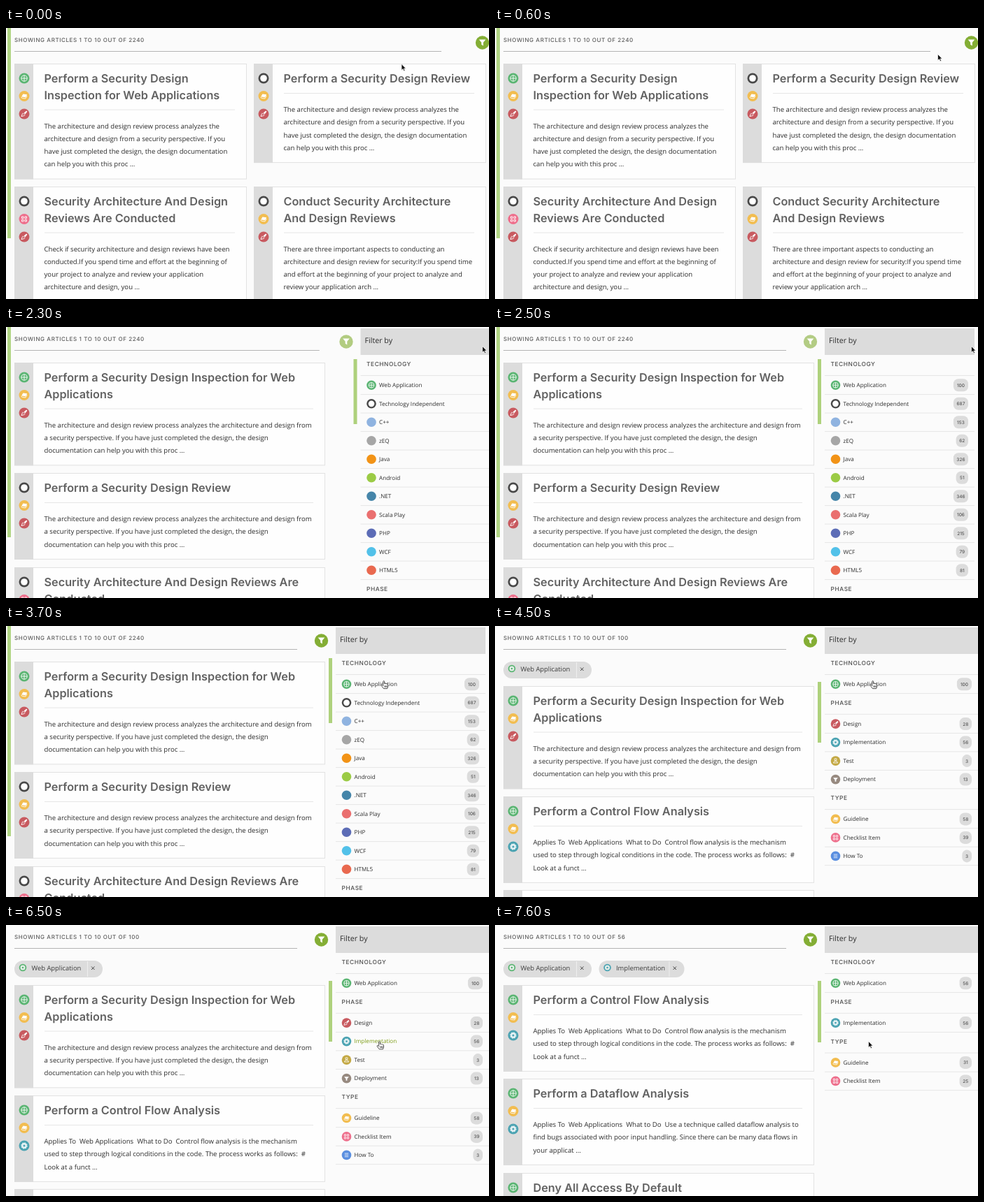
Recreate the animation shown at these times as an HTML page. Size 690x388 px, loop 8 s.

```html
<!DOCTYPE html>
<html lang="en">
<head>
<meta charset="utf-8">
<title>Article filter</title>
<style>
  html, body { margin: 0; width: 100%; height: 100%; overflow: hidden; background: #fbfbfb; }
  svg { display: block; width: 100%; height: 100%; }
  text { white-space: pre; text-rendering: geometricPrecision; font-family: "Open Sans", "Noto Sans", sans-serif; fill: #2c2c2c; }
  .title, .status, .section, .count { font-family: Inter, Roboto, sans-serif; }
  .title { font-size: 16.25px; font-weight: 600; fill: #626262; }
  .body { font-size: 9.6px; }
  .status { font-size: 8px; letter-spacing: .6px; font-weight: 500; fill: #5c5c5c; }
  .section { font-size: 8.4px; letter-spacing: .55px; font-weight: 500; fill: #4c4c4c; }
  .filter { font-size: 10.7px; }
  .item { font-size: 8.15px; }
  .chip { font-size: 9.4px; fill: #3c3c3c; }
  .count { font-size: 6.5px; font-weight: 500; text-anchor: middle; fill: #555; }
  .hover { fill: #7c9c14; }
</style>
</head>
<body>
<svg id="stage" viewBox="0 0 690 388"></svg>
<script>
const rect = (x, y, w, h, fill, extra = '') =>
  `<rect x="${x}" y="${y}" width="${w}" height="${h}" fill="${fill}" ${extra}/>`;
const line = (x1, x2, y, color = '#e6e6e6') =>
  `<path d="M${x1} ${y}H${x2}" stroke="${color}"/>`;
const text = (x, y, cls, str) => `<text x="${x}" y="${y}" class="${cls}">${str}</text>`;

// Category icons: colour and white glyph, drawn for a disc of radius 7.5
const glyph = d => `<path d="${d}" fill="none" stroke="#fff" stroke-width=".9"/>`;
const ring = '<circle r="4.2" fill="none" stroke="#fff" stroke-width=".9"/>';
const ICONS = {
  web: ['#5bb573', ring + glyph('M0-4.2V4.2M-4.2 0H4.2')],
  any: ['#484848', '<circle r="4.8" fill="#fff"/>'],
  guide: ['#f2bd50', '<path d="M-1.6-3L4.2-2.2 2 1.8-3.8 1Z" fill="#fff"/>' + glyph('M-4 1.4Q-4 2.8-2.5 3L2 3.4 4-.5')],
  design: ['#c85a60', '<path d="M3.2-4.4L4.4-3.2 1.4.4-.4-1.4Z" fill="#fff"/>' + glyph('M-1.8-1.2L1.2 1.8M-2.4-.6L-4 3.6.6 2.4')],
  check: ['#ee6f8c', glyph('M-3.5-3.5h2.5v2.5h-2.5zM1-3.5h2.5v2.5H1zM-3.5 1h2.5v2.5h-2.5zM1 1h2.5v2.5H1z')],
  code: ['#4ba3b2', '<circle r="3.9" fill="#fff" opacity=".85"/><circle r="4.2" fill="none" stroke="#fff" stroke-dasharray="1.6 1.7"/><circle r="1.5" fill="#4ba3b2"/>'],
  test: ['#c4a945', glyph('M-1.5-3.5h3v3h-3zM-3.5 3.2Q-3 .5 0 .5T3.5 3.2Z')],
  deploy: ['#978a80', '<path d="M-3.8-2.6H3.8L1 .6V3.4H-1V.6Z" fill="#fff"/>'],
  howto: ['#5a8fe0', glyph('M-3-2.5H3M-3 0H3M-3 2.5H3')]
};
function icon(name, x, y, r = 7.5) {
  const [color, mark] = ICONS[name] || [name, ''];
  return `<g transform="translate(${x} ${y}) scale(${r / 7.5})"><circle r="7.5" fill="${color}"/>${mark}</g>`;
}

function card(x, y, w, icons, titles, lines) {
  const ruleY = y + 42.5 + 23.5 * (titles.length - 1);
  const h = ruleY - y + 44 + 18.2 * (lines.length - 1);
  return rect(x + .5, y + .5, w, h, '#fefefe', 'stroke="#e2e2e2"') +
    rect(x, y, 27, h + 1, '#dcdcdc') +
    icons.map((name, i) => icon(name, x + 14, y + 21 + 25.5 * i)).join('') +
    titles.map((s, i) => text(x + 42.5, y + 27.2 + 23.5 * i, 'title', s)).join('') +
    line(x + 43, x + w - 16, ruleY) +
    lines.map((s, i) => text(x + 42.5, ruleY + 26.6 + 18.2 * i, 'body', s)).join('');
}

function chip(x, w, name, label) {
  const color = ICONS[name][0];
  return rect(x, 51, w, 24, '#dcdcdc', 'rx="12"') +
    `<circle cx="${x + 12}" cy="61" r="4.4" fill="#e6eeea" stroke="${color}" stroke-width="1.8"/>` +
    `<circle cx="${x + 12}" cy="61" r="1.3" fill="${color}"/>` +
    text(x + 24.5, 65, 'chip', label) +
    `<path d="M${x + w - 21.5} 52v22" stroke="#eee"/>` +
    `<path d="M${x + w - 16} 59.5l4.5 4.5m0-4.5l-4.5 4.5" stroke="#444"/>`;
}

// Each section: [heading, [icon, label, count], ...]
function sidebar(right, sections, barY, barH) {
  let y = 53;
  let out = rect(460, 0, 230, 388, '#fbfbfb') + rect(461, barY, 5, barH, '#aed17c') +
    rect(471, 2, right - 471, 38, '#dcdcdc') + text(477, 23.2, 'filter', 'Filter by');
  for (const [heading, ...items] of sections) {
    out += text(479.5, y + 3, 'section', heading) + line(471, right, y + 16.5);
    y += 30.3;
    for (const [name, label, count] of items) {
      const w = 10 + 3.7 * String(count).length, end = Math.min(right - 9, 681);
      out += icon(name, 486.5, y, 6.8) +
        `<text x="497.5" y="${y + 2.8}" class="item" data-label="${label}">${label}</text>` +
        rect(end - w, y - 9, w, 18, '#dcdcdc', 'rx="7"') +
        text(end - w / 2, y + 2.4, 'count', count) + line(471, right, y + 13.3);
      y += 26.5;
    }
  }
  return out;
}

const REVIEW = 'Perform a Security Design Review';
const INSPECT = ['Perform a Security Design Inspection for Web', 'Applications'];
const wideBody = ['The architecture and design review process analyzes the',
  'architecture and design from a security perspective. If you',
  'have just completed the design, the design documentation', 'can help you with this proc …'];
const longBody = ['The architecture and design review process analyzes the architecture and design from',
  'a security perspective. If you have just completed the design, the design',
  'documentation can help you with this proc …'];
const controlFlow = [['web', 'guide', 'code'], ['Perform a Control Flow Analysis'],
  ['Applies To  Web Applications  What to Do  Control flow analysis is the mechanism',
   'used to step through logical conditions in the code. The process works as follows:  #',
   'Look at a funct …']];
const webDesign = ['web', 'guide', 'design'], anyDesign = ['any', 'guide', 'design'];
const status = s => text(12, 19.5, 'status', 'SHOWING ARTICLES 1 TO 10 OUT OF ' + s);
const greenBar = rect(2, 0, 5, 301, '#b1d584');

const twoColumns = status(2240) + greenBar +
  card(12, 51, 331, webDesign, ['Perform a Security Design', 'Inspection for Web Applications'], wideBody) +
  card(354, 51, 331, anyDesign, [REVIEW], wideBody) +
  card(12, 227, 331, ['any', 'check', 'design'], ['Security Architecture And Design', 'Reviews Are Conducted'],
    ['Check if security architecture and design reviews have been',
     'conducted.If you spend time and effort at the beginning of',
     'your project to analyze and review your application', 'architecture and design, you …']) +
  card(354, 227, 331, anyDesign, ['Conduct Security Architecture', 'And Design Reviews'],
    ['There are three important aspects to conducting an',
     'architecture and design review for security:If you spend time',
     'and effort at the beginning of your project to analyze and', 'review your application arch …']);

const oneColumn = status(2240) + greenBar +
  card(12, 51, 443, webDesign, INSPECT, longBody) +
  card(12, 209, 443, anyDesign, [REVIEW], longBody) +
  card(12, 344, 443, ['any', 'check', 'design'], ['Security Architecture And Design Reviews Are', 'Conducted'], ['']);

const allFilters = sidebar(685, [['TECHNOLOGY', ['web', 'Web Application', 100],
  ['any', 'Technology Independent', 687], ['#8fb3e0', 'C++', 153], ['#a6a6a6', 'zEQ', 62],
  ['#f29316', 'Java', 326], ['#9bcb45', 'Android', 51], ['#4585a9', '.NET', 346],
  ['#ea6f6f', 'Scala Play', 106], ['#5c6cb6', 'PHP', 215], ['#52c1e9', 'WCF', 79],
  ['#e9694f', 'HTML5', 81]], ['PHASE']], 46, 93);

const webOnly = status(100) + chip(12, 126, 'web', 'Web Application') +
  card(12, 86, 443, webDesign, INSPECT, longBody) +
  card(12, 244, 443, ...controlFlow) + card(12, 378, 443, [], [''], ['']) +
  sidebar(690, [['TECHNOLOGY', ['web', 'Web Application', 100]],
    ['PHASE', ['design', 'Design', 28], ['code', 'Implementation', 56], ['test', 'Test', 3], ['deploy', 'Deployment', 13]],
    ['TYPE', ['guide', 'Guideline', 58], ['check', 'Checklist Item', 39], ['howto', 'How To', 3]]], 80, 87);

const webImplementation = status(56) + chip(12, 126, 'web', 'Web Application') +
  chip(148.5, 122, 'code', 'Implementation') +
  card(12, 86, 443, ...controlFlow) +
  card(12, 220, 443, controlFlow[0], ['Perform a Dataflow Analysis'],
    ['Applies To  Web Applications  What to Do  Use a technique called dataflow analysis to',
     'find bugs associated with poor input handling. Since there can be many data flows in',
     'your applicat …']) +
  card(12, 355, 443, controlFlow[0], ['Deny All Access By Default'], ['']) +
  sidebar(690, [['TECHNOLOGY', ['web', 'Web Application', 56]], ['PHASE', ['code', 'Implementation', 56]],
    ['TYPE', ['guide', 'Guideline', 31], ['check', 'Checklist Item', 25]]], 80, 88);

const groups = { twoColumns, oneColumn, allFilters, webOnly, webImplementation };
const stage = document.getElementById('stage');
stage.innerHTML = rect(0, 0, 690, 388, '#fbfbfb') +
  Object.entries(groups).map(([id, content]) => `<g id="${id}">${content}</g>`).join('') +
  `<path id="rule" stroke="#b4b4b4"/>
  <g id="funnel"><circle r="9.7" fill="#fbfbfb"/><circle id="disc" r="9.7" fill="#84ae35"/>
    <path d="M-4.8-4.5H4.8L1.3-.2V4.6L-1.3 2.8V-.2Z" fill="#fff"/></g>
  <path id="arrow" d="M0 0V9L2.1 7.1 3.5 10.3 5 9.6 3.6 6.5H6.3Z" fill="#111" stroke="#fff" stroke-width=".7"/>
  <path id="hand" d="M-.9 6V.9Q0-.6.9.9V4.2Q2.2 3.3 2.8 4.4 4 3.7 4.5 4.9 6 4.5 6 6V8.3L5 11.3H-.3L-3.3 7.2Q-3.4 5.4-1.9 6.2L-.9 7.2ZM1.2 7v2.6M2.9 7v2.6M4.4 7v2.6" fill="#fff" stroke="#222" stroke-width=".8"/>`;
const el = id => document.getElementById(id);
const label = (group, name) => stage.querySelector(`#${group} [data-label="${name}"]`);
const webLabel = label('allFilters', 'Web Application');
const codeLabel = label('webOnly', 'Implementation');

const show = (id, on) => el(id).style.display = on ? '' : 'none';
const move = (id, x, y) => el(id).setAttribute('transform', `translate(${x} ${y})`);
function ease(t, start, end) {
  const p = Math.min(1, Math.max(0, (t - start) / (end - start)));
  return p * p * (3 - 2 * p);
}

// Cursor stops: [leave, arrive, x, y]
const STOPS = [[100, 1000, 680.5, 27.5], [3000, 3700, 539.7, 78.3], [5300, 6100, 533.5, 166.5]];

function draw(t) {
  show('twoColumns', t < 2000);
  show('oneColumn', t >= 2000 && t < 4500);
  show('allFilters', t >= 1900 && t < 4500);
  show('webOnly', t >= 4500 && t < 7500);
  show('webImplementation', t >= 7500);

  const open = ease(t, 1850, 2450);
  move('allFilters', 230 * (1 - open), 0);
  move('funnel', 680.5 - 230 * open, 21);
  el('rule').setAttribute('d', `M12 33.5H${622 - 206 * open}`);
  el('disc').setAttribute('opacity', 1 - .2 * ease(t, 900, 1150) - .2 * ease(t, 1900, 2400) + .4 * ease(t, 3000, 3300));
  webLabel.classList.toggle('hover', t >= 3850);
  codeLabel.classList.toggle('hover', t >= 6200);

  let x = 565, y = 51.5;
  for (const [leave, arrive, toX, toY] of STOPS) {
    const p = ease(t, leave, arrive);
    x += (toX - x) * p;
    y += (toY - y) * p;
  }
  const overHeading = t > 5300 && y > 97 && y < 126;
  const pointing = t >= 850 && t < 2000 || t >= 3450 && t < 7500 && !overHeading;
  show('hand', pointing);
  show('arrow', !pointing);
  move('hand', x, y);
  move('arrow', x, y);
}

function frame() {
  draw(performance.now() % 8000);
  requestAnimationFrame(frame);
}
frame();
</script>
</body>
</html>
```
